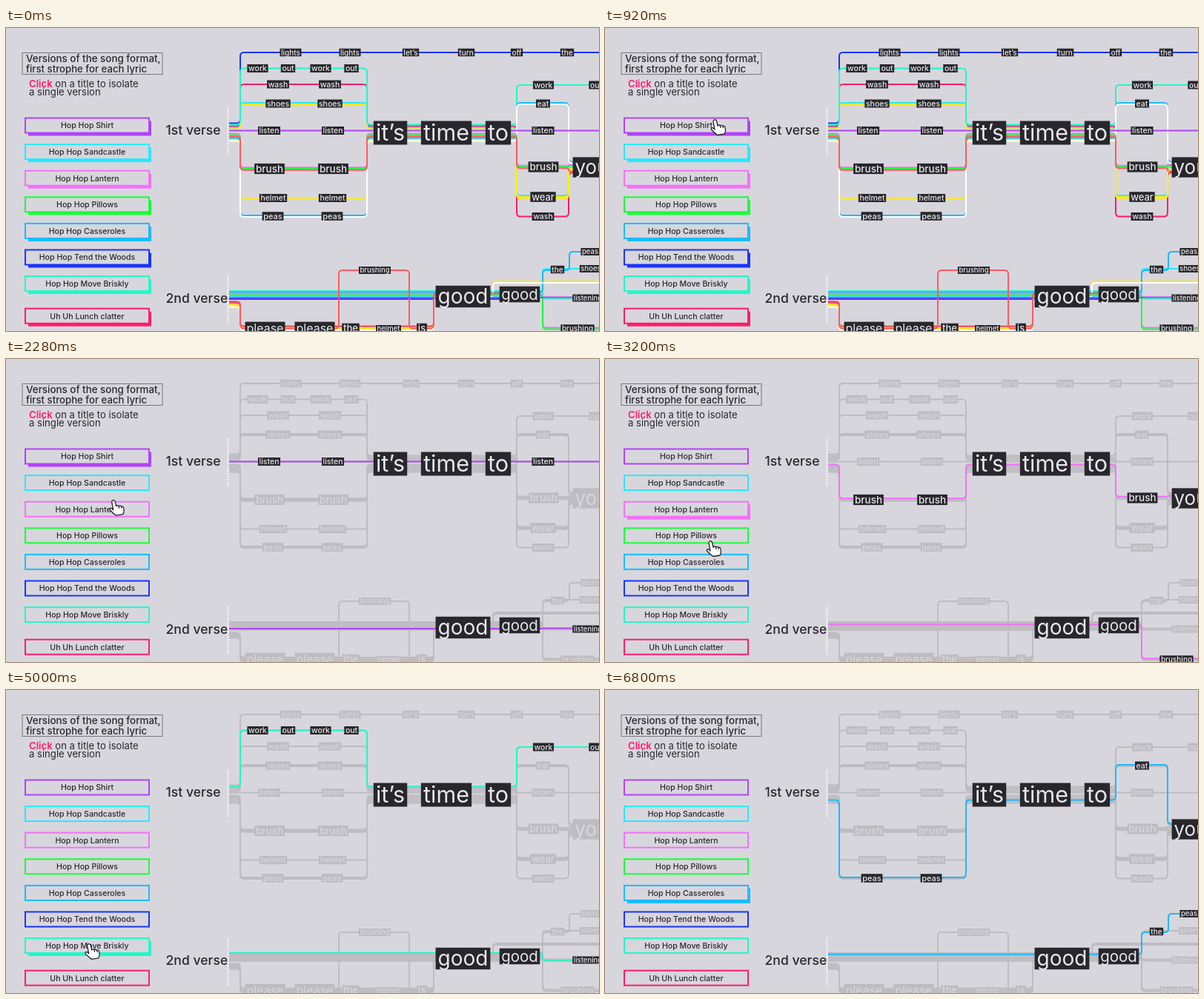
Write an HTML page that moves like this. It is 800 px wide and 409 px high and loops after 6.84 s.

```html
<!DOCTYPE html>
<html lang="en">
<head>
<meta charset="utf-8">
<title>Song versions</title>
<style>
html, body { margin: 0; width: 100%; height: 100%; overflow: hidden; background: #d8d6dd; }
svg { display: block; width: 800px; height: 409px; font-family: Inter, "Open Sans", sans-serif; font-weight: 500; fill: #29282c; }
.label { text-anchor: middle; }
</style>
</head>
<body>
<svg id="stage" viewBox="0 0 800 409"></svg>
<script>
const LOOP = 6840, EDGE = 800, PITCH = 1.8;
const DARK = '#28272b', GREY = '#bdbcc0', PAPER = '#d8d6dd';
const stage = document.getElementById('stage');

function add(tag, attrs, text) {
  const el = document.createElementNS('http://www.w3.org/2000/svg', tag);
  for (const k in attrs) el.setAttribute(k, attrs[k]);
  if (text) el.textContent = text;
  return stage.appendChild(el);
}

// Versions are numbered by one hex digit each
const colors = ['#b044f8', '#28e8ff', '#f470fa', '#18ff38', '#18bcff', '#1a34fa',
  '#20f8c8', '#ff1c6c', '#ff5a62', '#fff000', '#ffe828', '#ffffff'];
const all = '012346789ab', low = '789ab';

// Trunk lines from top to bottom; a blank leaves a gap
const verse1 = { order: '5671a0 2384 9b'.replace('4 ', '4'), top: 128.5, pitch: 2, lanes: [] };
const verse2 = { order: '6423105 78a9b', top: 355, pitch: PITCH, lanes: [] };
const words = [];

// Versions that leave the trunk between two x positions, and the words they sing there
function lane(verse, from, to, y, ids, size, ...sung) {
  verse.lanes.push({ from, to, y, ids });
  for (const [text, ...xs] of sung) for (const x of xs) words.push({ text, x, y, size, ids });
}
const trunk = (text, x, y, size, ids = all) => words.push({ text, x, y, size, ids });
const twice = (text, mid, gap) => [text, mid - gap, mid + gap];

lane(verse1, 316, EDGE, 33, '5', 10, ['lights', 384, 464], ['let’s', 546], ['turn', 621], ['off', 689], ['the', 757]);
lane(verse1, 316, 487, 54.5, '6', 10.5, ['work', 339.5, 424.5], ['out', 380.5, 466]);
lane(verse1, 316, 487, 76, '7', 10.5, twice('wash', 402, 35));
lane(verse1, 316, 487, 102, '1a', 10.5, twice('shoes', 402, 35));
lane(verse1, 316, 487, 190, '238', 13.5, twice('brush', 398.5, 43));
lane(verse1, 316, 487, 229.5, '9', 10.5, twice('helmet', 400.5, 40));
lane(verse1, 316, 487, 254, '4b', 11, twice('peas', 400, 40));
lane(verse1, 689, EDGE, 77, '6', 10.5, ['work', 725], ['out', 796]);
lane(verse1, 689, 759, 102, '4b', 10.5, ['eat', 724.5]);
lane(verse1, 689, 759, 187.5, '238', 13.5, ['brush', 725]);
lane(verse1, 689, 759, 228, '19a', 13, ['wear', 724.5]);
lane(verse1, 689, 759, 254.5, '7', 10.5, ['wash', 724.5]);
lane(verse1, 759, EDGE, 188, '4b231a987', 26, ['you', 790]);
twice('listen', 398, 43).slice(1).concat(724.5).forEach(x => trunk('listen', x, 138.5, 10.5, '0'));
trunk('it’s', 518.5, 141.5, 30.5);
trunk('time', 594, 141.5, 30.5);
trunk('to', 664, 141.5, 30.5);

lane(verse2, 316, 670, 365.8, '5');
lane(verse2, 316, 577, 405.5, '79ab');
lane(verse2, 316, 449, 405.5, '8');
lane(verse2, 449, 544, 327, '8', 9.5, ['brushing', 497.5]);
lane(verse2, 544, 577, 405.5, '8');
lane(verse2, 577, 670, 360, low);
lane(verse2, 657, EDGE, 343, 'ab');
lane(verse2, 724, 760, 326, '14', 10, ['the', 744]);
lane(verse2, 760, EDGE, 302, '4', 9.5, ['peas', 788]);
lane(verse2, 760, EDGE, 325, '1', 9.5, ['shoes', 789]);
lane(verse2, 724, EDGE, 364.5, '06', 9.5, ['listening', 785]);
lane(verse2, 724, EDGE, 405.5, '23', 10, ['brushing', 771]);
trunk('please', 349.5, 405, 16, low);
trunk('please', 416.5, 405, 16, low);
trunk('the', 465, 405.5, 13, low);
trunk('helmet', 516, 406, 9.5, low);
trunk('is', 561, 405.5, 13, low);
trunk('good', 616.5, 362.5, 28, all);
trunk('good', 693, 359.5, 20.5, all);

// Follows one version through its lanes, back to the trunk wherever there is a gap
function route(verse, id) {
  const home = verse.top + verse.pitch * verse.order.indexOf(id);
  const own = verse.lanes.filter(l => l.ids.includes(id)).sort((a, b) => a.from - b.from);
  let y = home, d = `M301 ${y}`;
  const turn = (x, to) => {
    const r = Math.min(5, Math.abs(to - y) / 2), s = Math.sign(to - y) * r;
    d += `H${x - r}Q${x} ${y} ${x} ${y + s}V${to - s}Q${x} ${to} ${x + r} ${to}`;
    y = to;
  };
  own.forEach((l, i) => {
    turn(l.from, l.y + PITCH * (l.ids.indexOf(id) - (l.ids.length - 1) / 2));
    if (own[i + 1] && own[i + 1].from > l.to) turn(l.to, home);
  });
  return d + `H${own.length ? own[own.length - 1].to : EDGE}`;
}

const routes = colors.map((_, i) => route(verse1, i.toString(16)) + route(verse2, i.toString(16)));
const lines = [...'571a694b2380'].map(c => {
  const id = parseInt(c, 16);
  return { id, el: add('path', { d: routes[id], fill: 'none', 'stroke-width': 2 }) };
});
const highlight = add('path', { fill: 'none', 'stroke-width': 2 });

const labels = words.map(({ text, x, y, size, ids }) => {
  const box = add('rect', {});
  const word = add('text', { x, y: y + size * .35, 'font-size': size, 'font-weight': size > 15 ? 400 : 500, class: 'label' }, text);
  const w = word.getComputedTextLength() + 1.5 + size * .16, h = size * 1.05;
  for (const [k, v] of Object.entries({ x: x - w / 2, y: y - h / 2, width: w, height: h })) box.setAttribute(k, v);
  return { ids, box, word };
});

// Left column
add('rect', { x: 22, y: 33.5, width: 189, height: 29, fill: 'none', stroke: '#77757c' });
const say = (x, y, size, text, weight = 500) =>
  add('text', { x, y, 'font-size': size, 'font-weight': weight }, text);
say(27, 45.5, 13.4, 'Versions of the song format,');
say(27, 59.5, 13.2, 'first strophe for each lyric');
say(31, 80, 13.1, '', 400).innerHTML = '<tspan fill="#ff1c6c" font-weight="600">Click</tspan> on a title to isolate';
say(31, 91, 13.1, 'a single version', 400);
[['1st verse', 108], ['2nd verse', 335]].forEach(([text, y]) => {
  say(215.5, y + 36, 17.6, text);
  add('path', { d: `M299.5 ${y}v64`, stroke: '#fff', 'stroke-width': 1.8, 'stroke-dasharray': '1.8 1.8' });
});

const titles = ['Hop Hop Shirt', 'Hop Hop Sandcastle', 'Hop Hop Lantern', 'Hop Hop Pillows',
  'Hop Hop Casseroles', 'Hop Hop Tend the Woods', 'Hop Hop Move Briskly', 'Uh Uh Lunch clatter'];
const shadows = titles.map((text, i) => {
  const y = 121.5 + 35.6 * i + (i === titles.length - 1 ? 8 : 0);
  const shadow = add('rect', { x: 30, y: y + 4, width: 166, height: 20, fill: colors[i] });
  add('rect', { x: 26, y, width: 167, height: 20, fill: PAPER, stroke: colors[i], 'stroke-width': 2 });
  add('text', { x: 109.5, y: y + 13.8, 'font-size': 10.6, class: 'label' }, text);
  return shadow;
});

// Pointing hand, fingertip at the origin
const hand = add('path', {
  d: 'M-2 2Q-1-1 1 0Q2 0 3 3L4 8Q6 6 7.5 8Q9.5 6.5 11 8.5Q13.5 7.5 14 10.5L14.5 14Q14.5 17 13 19L4 20.5Q0 18-4.5 13Q-5 10-2 11L0 13ZM7.5 8l.5 3M11 8.5l.5 2.5',
  fill: '#fff', stroke: '#222', 'stroke-width': 1.3, 'stroke-linejoin': 'round'
});

// Where the hand rests, and when it clicks a version
const away = [815, 230];
const visits = [
  { id: 0, arrive: 820, click: 1240, leave: 1940, at: [148, 124] },
  { id: 2, arrive: 2400, click: 2560, leave: 2860, at: [144, 204] },
  { id: 3, arrive: 3200, click: 3440, leave: 3640, at: [142, 246] },
  { id: 6, arrive: 4160, click: 4480, leave: 4900, at: [112, 353] },
  { id: 4, arrive: 5360, click: 5480, leave: 6440, at: [109, 271] }
];
const stops = [{ leave: 420, at: away }, ...visits, { arrive: 6780, at: away }];

function pointerAt(t) {
  const n = stops.findIndex(s => t < s.arrive);
  if (n < 0) return away;
  const a = stops[n - 1], b = stops[n];
  const p = Math.max(0, (t - a.leave) / (b.arrive - a.leave)), e = p * p * (3 - 2 * p);
  return a.at.map((v, i) => v + (b.at[i] - v) * e);
}

let shown;
function select(id) {
  if (id === shown) return;
  shown = id;
  const none = id < 0;
  for (const l of lines) l.el.setAttribute('stroke', none ? colors[l.id] : GREY);
  highlight.setAttribute('d', none ? '' : routes[id]);
  highlight.setAttribute('stroke', none ? 'none' : colors[id]);
  for (const { ids, box, word } of labels) {
    const on = none || ids.includes(id.toString(16));
    box.setAttribute('fill', on ? DARK : GREY);
    word.setAttribute('fill', on ? '#e8e7ec' : PAPER);
  }
  shadows.forEach((s, i) => s.setAttribute('visibility', none || i === id ? 'visible' : 'hidden'));
}

const start = performance.now();
function frame() {
  const t = (performance.now() - start) % LOOP;
  const last = visits.filter(v => v.click <= t).pop();
  select(last ? last.id : -1);
  hand.setAttribute('transform', `translate(${pointerAt(t)})`);
  requestAnimationFrame(frame);
}
frame();
</script>
</body>
</html>
```
